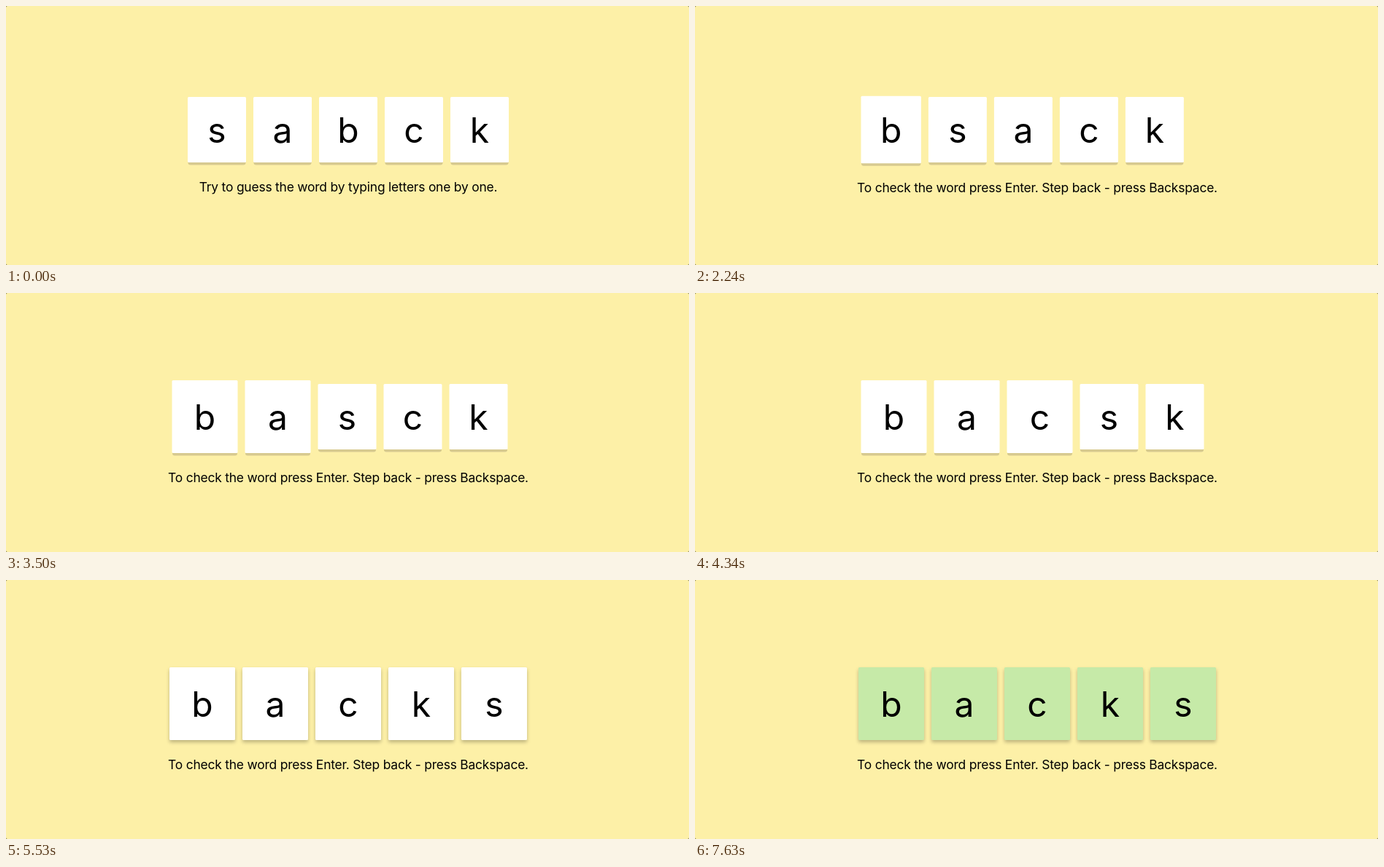
Animation of 936x356 px, one loop 7980 ms. Source, as an HTML page with a canvas:

```html
<!DOCTYPE html>
<html lang="en">
<head>
<meta charset="utf-8">
<title>Guess the word</title>
<style>
  html, body { margin: 0; width: 100%; height: 100%; overflow: hidden; background: #5f5b45; }
  canvas { display: block; }
</style>
</head>
<body>
<canvas id="stage" width="936" height="356"></canvas>
<script>
const ctx = document.getElementById('stage').getContext('2d');

const LOOP = 7980;
const CENTER_X = 469, CENTER_Y = 170;
const GAP = 10, MIN_ROW = 483;
const SMALL = { w: 80, h: 90 }, GROWTH = 10;
const GROW_MS = 350, CHECK_AT = 6050, CHECK_MS = 1500, SOFT_SHADOW_AT = 5020;
const BACKGROUND = '#fdf0a7', WHITE = [255, 255, 255], GREEN = [198, 234, 168];
const LETTERS = 'sabck';
const KEYS = [
  { letter: 'b', at: 2180 },
  { letter: 'a', at: 3110 },
  { letter: 'c', at: 3740 },
  { letter: 'k', at: 4590 },
  { letter: 's', at: 5020 }
];

const clamp = v => Math.min(1, Math.max(0, v));

// The CSS "ease" curve: cubic-bezier(.25, .1, .25, 1)
function ease(x) {
  if (x <= 0 || x >= 1) return clamp(x);
  const bezier = (a, b, s) => 3 * a * s * (1 - s) ** 2 + 3 * b * s * s * (1 - s) + s ** 3;
  let low = 0, high = 1;
  for (let i = 0; i < 20; i++) {
    const mid = (low + high) / 2;
    if (bezier(.25, .25, mid) < x) low = mid; else high = mid;
  }
  return bezier(.1, 1, low);
}

const progress = (t, start, duration) => ease((t - start) / duration);

function fillRound(x, y, w, h, radius, color) {
  ctx.fillStyle = color;
  ctx.beginPath();
  ctx.roundRect(x, y, w, h, radius);
  ctx.fill();
}

function fillText(text, x, baseline, size, spacing) {
  ctx.font = `${size}px Inter, sans-serif`;
  ctx.letterSpacing = spacing + 'px';
  ctx.textAlign = 'center';
  ctx.fillStyle = '#000';
  ctx.fillText(text, x, baseline);
}

function drawCard(letter, x, w, h, color, softShadow) {
  const y = CENTER_Y - h / 2;
  ctx.save();
  if (softShadow) {
    ctx.shadowColor = 'rgba(0, 0, 0, .25)';
    ctx.shadowBlur = 5;
    ctx.shadowOffsetY = 3;
  } else {
    fillRound(x + .5, y + 5, w - 1, h - 1.5, 3, '#d7ca90');
  }
  fillRound(x, y, w, h, 1.5, color);
  ctx.restore();
  fillText(letter, x + w / 2, 187.5, 48, 0);
}

function draw(t) {
  const typed = KEYS.filter(key => t >= key.at);
  const rest = [...LETTERS].filter(letter => !typed.some(key => key.letter === letter));
  const cards = [
    ...typed.map(key => ({ letter: key.letter, grow: GROWTH * progress(t, key.at, GROW_MS) })),
    ...rest.map(letter => ({ letter, grow: 0 }))
  ];

  const green = progress(t, CHECK_AT, CHECK_MS);
  const color = `rgb(${WHITE.map((c, i) => Math.round(c + (GREEN[i] - c) * green))})`;

  ctx.clearRect(0, 0, 936, 356);
  fillRound(0, 0, 936, 356, 2, BACKGROUND);

  // The longer hint widens the row, which is then filled from the left.
  const total = cards.reduce((sum, card) => sum + SMALL.w + card.grow + GAP, -GAP);
  let x = CENTER_X - (typed.length ? Math.max(MIN_ROW, total) : total) / 2;
  for (const { letter, grow } of cards) {
    drawCard(letter, x, SMALL.w + grow, SMALL.h + grow, color, t >= SOFT_SHADOW_AT);
    x += SMALL.w + grow + GAP;
  }

  const hint = typed.length
    ? 'To check the word press Enter. Step back - press Backspace.'
    : 'Try to guess the word by typing letters one by one.';
  fillText(hint, CENTER_X, 255 + cards[0].grow / 2, 17.4, -.19);
}

function frame() {
  draw(performance.now() % LOOP);
  requestAnimationFrame(frame);
}
frame();
</script>
</body>
</html>
```
